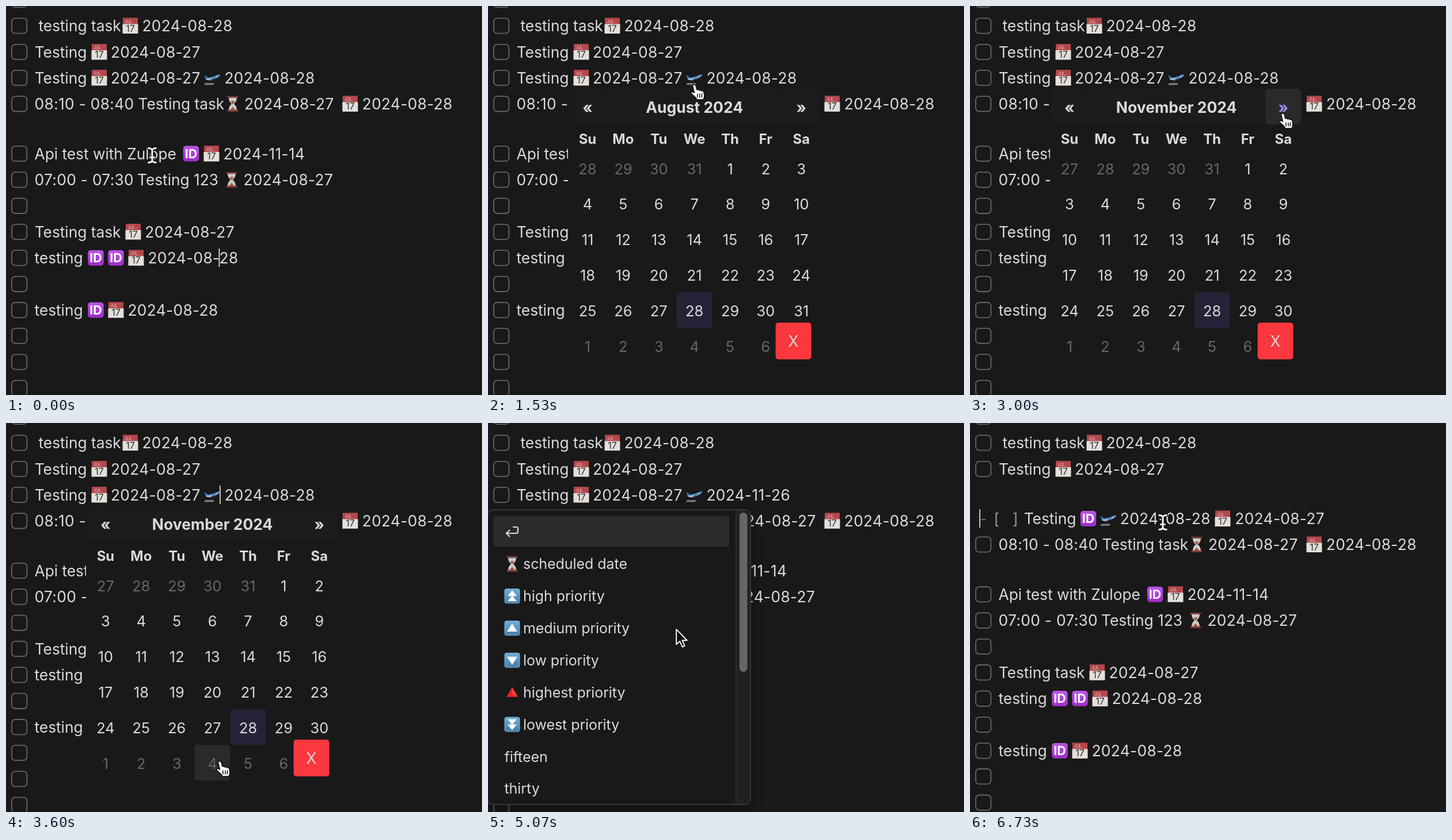
An HTML page that plays this animation: 827x677 px, repeating every 6800 ms.

```html
<!DOCTYPE html>
<html lang="en">
<head>
<meta charset="utf-8">
<title>Task dates</title>
<style>
  html, body { margin: 0; width: 100%; height: 100%; overflow: hidden; background: #191919; }
  svg { display: block; width: 827px; height: 677px; }
  text {
    font: 440 26.4px Inter, "Noto Sans", sans-serif;
    font-optical-sizing: none;
    letter-spacing: -.06px;
    fill: #dadada;
    white-space: pre;
  }
  .num { letter-spacing: .28px; }
  .box { fill: none; stroke: #666; stroke-width: 1.8; }
  .mark { fill: #999; }
  .mid { text-anchor: middle; }
  .day { font-size: 25.5px; }
  .bold { font-size: 24px; font-weight: 700; }
  .title { font-size: 26.6px; font-weight: 700; }
  .dim { fill: #666; }
  .hot { fill: #a78bfa; }
  .item { font-size: 25px; }
  .caret { fill: #e2e2e2; }
  #menu { filter: drop-shadow(0 4px 10px rgba(0, 0, 0, .35)); }
</style>
</head>
<body>
<svg viewBox="0 0 827 677">
  <defs>
    <linearGradient id="purple" x2="0" y2="1"><stop stop-color="#bd55ea"/><stop offset="1" stop-color="#9c2bc6"/></linearGradient>
    <linearGradient id="blue" x2="0" y2="1"><stop stop-color="#6db0d8"/><stop offset="1" stop-color="#427fa8"/></linearGradient>
    <g id="cal">
      <path d="M-13-14H13V-2H-13z" fill="#b3474c"/>
      <path d="M-13.5-3H13.5V13.5H-13.5z" fill="#e4dfda"/>
      <text x="-10" y="-5" style="font-size:7px;fill:#e9c8c8">JUL</text>
      <text class="mid" y="10" style="font-size:16px;fill:#2e2e2e">17</text>
    </g>
    <g id="id">
      <rect x="-13.7" y="-13.5" width="27.4" height="27" rx="5" fill="url(#purple)"/>
      <text class="mid" y="7.7" style="font-size:21.5px;font-weight:700;fill:#fff">ID</text>
    </g>
    <g id="plane">
      <path d="M-12 9H4L2 12.5H-14z" fill="#77797c"/>
      <path d="M-14-4L-11-4 -6 1H-11z" fill="#2f68a8"/>
      <path d="M-12 0Q0 0 9-5Q14-7 14-4Q6 3-5 4Q-11 4-12 0z" fill="#5b97d2"/>
      <path d="M-11 2Q1 2 13-3.5Q5 3-5 4Q-10 4-11 2z" fill="#b4c6d8"/>
      <path d="M3 0L-6 5.5H-2L8-1.5z" fill="#264f84"/>
    </g>
    <g id="glass">
      <path d="M-7-11H7Q7-4 1.8 0Q7 4 7 11H-7Q-7 4-1.8 0Q-7-4-7-11z" fill="#cfcbc8"/>
      <path d="M-4-5H4L0 1zM0 5L5 11H-5z" fill="#a85a4b"/>
      <path d="M-9.5-13.5H9.5V-10.5H-9.5zM-9.5 10.5H9.5V13.5H-9.5z" fill="#7d3f38"/>
    </g>
    <g id="tile"><rect x="-13" y="-12.5" width="26" height="25" rx="3" fill="url(#blue)" stroke="#7fb6d6"/></g>
    <g id="up"><use href="#tile"/><path d="M0-8L9 6H-9z" fill="#fff"/></g>
    <g id="down"><use href="#tile"/><path d="M0 8L9-6H-9z" fill="#fff"/></g>
    <g id="up2"><use href="#tile"/><path d="M0-10L8 0H-8zM0-1L8 9H-8z" fill="#fff"/></g>
    <g id="down2"><use href="#tile"/><path d="M0 10L8 0H-8zM0 1L8-9H-8z" fill="#fff"/></g>
    <g id="peak"><path d="M0-9L10 8H-10z" fill="#e8231f"/><path d="M0-9L10 8 0 3z" fill="#f5453c"/></g>
    <path id="stem" d="M-6.5-12.5Q-1-12.5 0-9Q1-12.5 6.5-12.5M0-9V9M-6.5 12.5Q-1 12.5 0 9Q1 12.5 6.5 12.5M-3.5 3.5H3.5"/>
  </defs>
  <g id="list"></g>
  <g id="picker"></g>
  <g id="menu"></g>
  <rect id="caret" class="caret" width="1.7" height="32"/>
  <rect y="676" width="827" height="1" fill="#120c0f"/>
  <g id="mouse" stroke-linejoin="round" stroke-linecap="round">
    <g id="beam" fill="none">
      <use href="#stem" stroke="#111" stroke-width="5.6"/>
      <use href="#stem" stroke="#fff" stroke-width="2.8"/>
    </g>
    <g id="hand">
      <path d="M-3.5 1Q-3-2 0-1.5Q2-1 2.5 2L4 8Q6 6 8 9Q10 7 12 10Q15 8 16 12L17 18Q17 22 15 25H4Q2 21-2 18L-6 14Q-6 10-2 12L-.5 13z" fill="#fff" stroke="#111" stroke-width="1.6"/>
      <path d="M5 15V21M9 15V21M12.5 15V21" stroke="#111" stroke-width="1.5"/>
    </g>
    <path id="arrow" d="M0-2V24L6 18.5 10.5 28.5 14.5 26.7 10.3 17H18.5z" fill="#111" stroke="#fff" stroke-width="1.9"/>
  </g>
</svg>
<script>
const LOOP = 6800;
const OPEN = 870, PICK = 4130, CLOSE = 6670;
const TURNS = [2270, 2670, 3000];
const CELL = 61.9, LEFT = 142, TOP = 144;
const $ = id => document.getElementById(id);

const rect = (x, y, w, h, r, fill, extra = '') =>
  `<rect x="${x}" y="${y}" width="${w}" height="${h}" rx="${r}" fill="${fill}" ${extra}/>`;
const text = (x, y, s, cls = '') => `<text x="${x}" y="${y + 9.5}" class="${cls}">${s}</text>`;
const icon = (x, y, name) => `<use href="#${name}" x="${x}" y="${y}"/>`;
const box = y => `<rect class="box" x="10" y="${y - 13.2}" width="26.4" height="26.4" rx="6"/>`;

// Parts alternate between x and content; "@" marks an icon.
function parts(y, list) {
  let out = '';
  for (let i = 0; i < list.length; i += 2) {
    const x = list[i], s = list[i + 1];
    out += s[0] === '@' ? icon(x, y, s.slice(1)) : text(x, y, s, /^\d/.test(s) ? 'num' : '');
  }
  return out;
}
const row = (y, ...list) => box(y) + parts(y, list);

// Task list
const A27 = '2024-08-27', A28 = '2024-08-28';
const dated = [49.7, 'Testing', 162, '@cal', 182, A27];
const later = [358, '@plane', 379.5];
$('list').innerHTML =
  row(-11) +
  row(34.5, 56.5, 'testing task', 216, '@cal', 236.5, A28) +
  row(80, ...dated) +
  `<g id="before">${row(125, ...dated, ...later, A28)}</g>` +
  `<g id="after">${row(125, ...dated, ...later, '2024-11-26')}</g>` +
  `<g id="raw">${text(17, 166.5, '-', 'dim') + text(41.5, 166.5, '[', 'mark') + text(74, 166.5, ']', 'mark') +
    parts(166.5, [93.7, 'Testing', 205.5, '@id', 240, '@plane', 260.8, A28, 439, '@cal', 460.3, A27])}</g>` +
  `<g id="rest">${
    row(170.3, 49.6, '08:10 - 08:40', 229.5, 'Testing task', 394, '@glass', 414, A27, 598, '@cal', 618.8, A28) +
    row(257, 49.5, 'Api test with Zulope', 321.5, '@id', 357, '@cal', 377.5, '2024-11-14') +
    row(302.4, 49.6, '07:00 - 07:30', 228, 'Testing 123', 392, '@glass', 412.5, A27) +
    row(347.8) +
    row(393, 49.7, 'Testing task', 221, '@cal', 241.3, A27) +
    row(438.4, 49.5, 'testing', 156, '@id', 191, '@id', 226, '@cal', 246.5, A28) +
    row(483.8) +
    row(529.2, 49.5, 'testing', 156, '@id', 191, '@cal', 211.5, A28) +
    row(574) + row(619.5) + row(664.8)}</g>`;

// Suggestion menu
const choices = [['glass', 'scheduled date'], ['up2', 'high priority'], ['up', 'medium priority'],
  ['down', 'low priority'], ['peak', 'highest priority'], ['down2', 'lowest priority'],
  ['', 'fifteen'], ['', 'thirty']];
$('menu').innerHTML =
  rect(-1, 151, 457, 513, 10, '#191919', 'stroke="#363636" stroke-width="2"') +
  '<path d="M431 152H447Q455 152 455 161V654Q455 663 447 663H431z" fill="#212121"/>' +
  rect(430, 152, 1.6, 511, 0, '#303030') +
  rect(437, 156, 13.5, 277, 6.7, '#666') +
  rect(9, 161.5, 410.5, 54, 5, '#2b2b2b') +
  '<path d="M43 181H49a3 3 0 0 1 3 3v5a3 3 0 0 1-3 3H32M38 186l-6 6 6 6" fill="none" stroke="#dadada" stroke-width="2.2"/>' +
  choices.map(([name, s], i) => {
    const y = 245.3 + 55.85 * i;
    return (name ? icon(42, y, name) : '') + text(name ? 61 : 28.5, y - .4, s, 'item');
  }).join('');

// Month picker
function picker(month, hot) {
  const first = new Date(Date.UTC(2024, month, 1));
  const name = first.toLocaleString('en-US', { month: 'long', timeZone: 'UTC' });
  const cx = c => LEFT + CELL * (c + .5);
  const tint = k => hot === k ? 'hot' : '';
  const back = k => hot === k ? '#2a2a2a' : '#1c1c1c';
  let out = rect(139, TOP, 439, 480, 0, '#191919') +
    rect(LEFT, TOP, CELL, CELL, 6, back('prev')) +
    rect(LEFT + CELL, TOP, CELL * 5, CELL, 6, back('title')) +
    rect(LEFT + CELL * 6, TOP, CELL, CELL, 6, back('next')) +
    text(cx(0), 176, '«', 'mid title ' + tint('prev')) +
    text(cx(3), 176.3, name + ' 2024', 'mid title ' + tint('title')) +
    text(cx(6), 176, '»', 'mid title ' + tint('next'));
  ['Su', 'Mo', 'Tu', 'We', 'Th', 'Fr', 'Sa'].forEach((d, c) => out += text(cx(c), 230, d, 'mid bold'));
  for (let i = 0; i < 42; i++) {
    const c = i % 7, r = Math.floor(i / 7), y = 283 + CELL * r;
    const date = new Date(Date.UTC(2024, month, 1 - first.getUTCDay() + i));
    const inside = date.getUTCMonth() === month, n = date.getUTCDate();
    const fill = inside && n === 28 ? '#282239' : hot === i ? '#2a2a2a' : '';
    if (fill) out += rect(LEFT + CELL * c, y - 32.2, CELL, CELL, 5, fill);
    out += text(cx(c), y, n, 'mid day' + (inside ? '' : ' dim'));
  }
  return out + rect(499.7, 551, 62, 64, 5, '#fa383e') + text(530.5, 583.7, 'X', 'mid');
}

function hovered(x, y) {
  const c = Math.floor((x - LEFT) / CELL), r = Math.floor((y - 250.8) / CELL);
  if (c < 0 || c > 6) return '';
  if (y > TOP && y < TOP + CELL) return c === 0 ? 'prev' : c === 6 ? 'next' : 'title';
  return r >= 0 && r < 6 ? r * 7 + c : '';
}

// Pointer stops: time, x, y
const path = [[0, 254, 260], [100, 254, 260], [800, 359, 138], [1530, 359, 138], [2150, 544, 188],
  [3030, 544, 188], [3560, 372, 590], [3680, 372, 590], [4030, 302, 539], [4170, 302, 539],
  [4450, 320, 537], [4640, 320, 537], [5520, 335, 173], [LOOP, 335, 173]];
function pointer(t) {
  const i = path.findIndex(p => p[0] > t);
  const [t0, x0, y0] = path[i - 1], [t1, x1, y1] = path[i];
  const u = (t - t0) / (t1 - t0), k = u * u * (3 - 2 * u);
  return [x0 + (x1 - x0) * k, y0 + (y1 - y0) * k];
}

const show = (id, on) => $(id).style.display = on ? '' : 'none';
let drawn = '';

function draw(t) {
  const [x, y] = pointer(t);
  const picking = t >= OPEN && t < PICK, closed = t >= CLOSE;
  show('before', t < PICK);
  show('after', t >= PICK && !closed);
  show('raw', closed);
  $('rest').setAttribute('transform', `translate(0 ${closed ? 41.2 : 0})`);
  show('picker', picking);
  show('menu', t >= PICK && !closed);

  if (picking) {
    const month = 7 + TURNS.filter(s => t >= s).length, hot = hovered(x, y);
    const key = month + '/' + hot;
    if (key !== drawn) $('picker').innerHTML = picker(month, hot);
    drawn = key;
  }

  const [since, cx, cy] = closed ? [CLOSE, 16.2, 150] : t >= PICK ? [PICK, 527, 109]
    : t >= OPEN ? [OPEN, 371.2, 109] : [-200, 369.6, 422];
  $('caret').setAttribute('x', cx);
  $('caret').setAttribute('y', cy);
  show('caret', (t - since) % 1200 < 600);

  $('mouse').setAttribute('transform', `translate(${x} ${y})`);
  show('hand', t >= 720 && t < PICK);
  show('arrow', t >= PICK && !closed);
  show('beam', t < 720 || closed);
}

let start;
function tick(now) {
  start ??= now;
  draw((now - start) % LOOP);
  requestAnimationFrame(tick);
}
draw(0);
requestAnimationFrame(tick);
</script>
</body>
</html>
```
